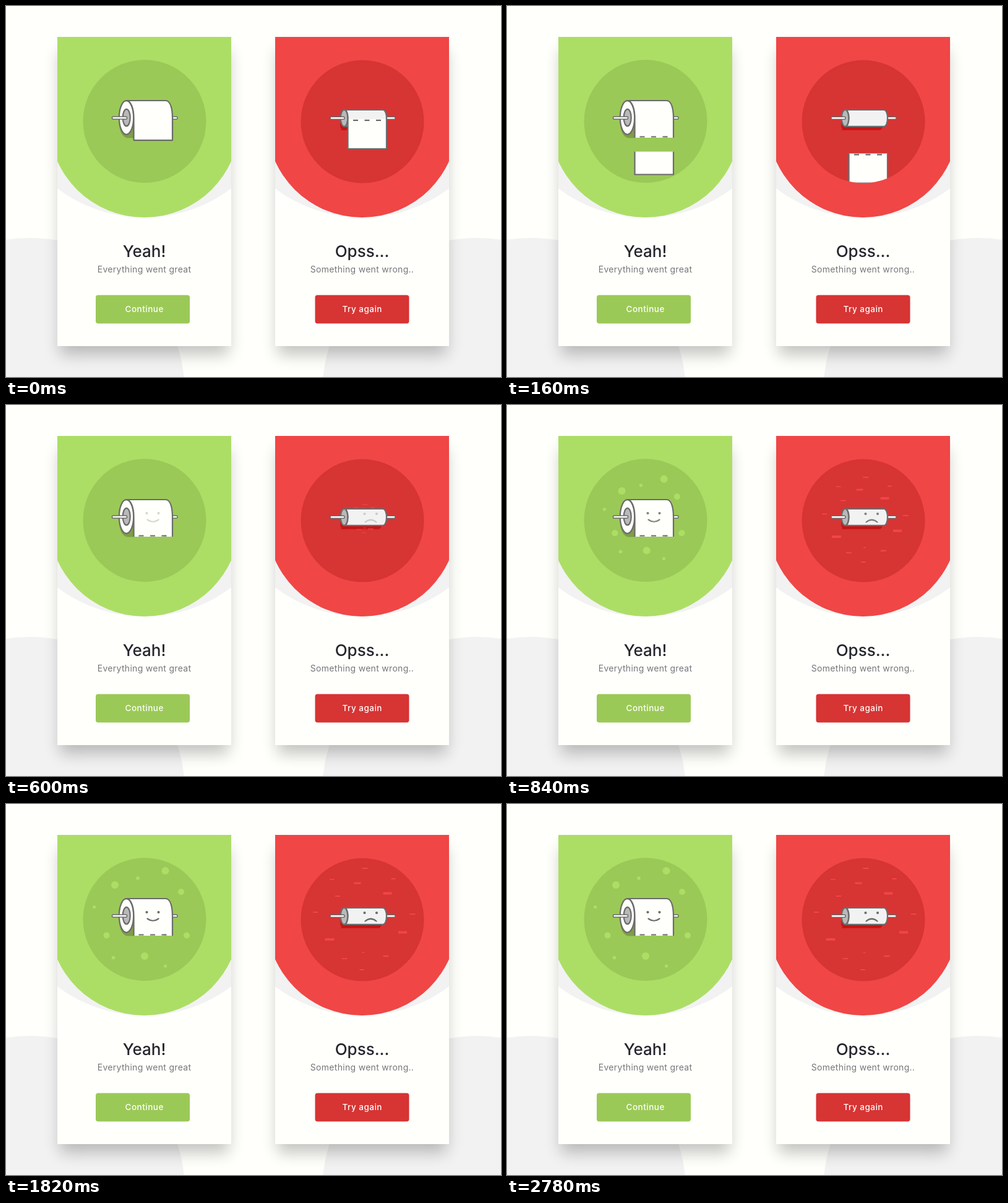
An HTML page that plays this animation: 800 px wide and 600 px high, repeating every 2.8 s.

```html
<!DOCTYPE html>
<html lang="en">
<head>
<meta charset="utf-8">
<title>Result cards</title>
<style>
  html, body { margin: 0; width: 100%; height: 100%; overflow: hidden; background: #fffffc; }
  svg { position: absolute; left: 0; top: 0; width: 800px; height: 600px; }
  .card { filter: drop-shadow(0 0 0 transparent); }
  .shadow { position: absolute; top: 50px; width: 281px; height: 500px;
    box-shadow: 0 18px 24px -4px rgba(0, 0, 0, .24); }
  text { font-family: Inter, "Open Sans", sans-serif; text-anchor: middle; }
  .title { font-size: 26px; font-weight: 500; fill: #25262d; }
  .note { font-size: 14px; letter-spacing: .3px; fill: #77777b; }
  .label { font-size: 13.5px; font-weight: 500; letter-spacing: .5px; fill: #fffffc; }
  .ink { stroke: #6b6b6b; stroke-width: 2.2; stroke-linejoin: round; }
  .paper { fill: #fffffc; }
  .line { fill: none; stroke-linecap: round; }
  .bar { fill: #fffffc; stroke: #6b6b6b; stroke-width: 1.6; }
  .face circle { fill: #6b6b6b; stroke: none; }
</style>
</head>
<body>
<svg viewBox="0 0 800 600" fill="#f2f2f2">
  <circle cx="38" cy="626" r="251"/>
  <circle cx="762" cy="626" r="251"/>
</svg>
<div class="shadow" style="left:83px"></div>
<div class="shadow" style="left:435px"></div>

<svg viewBox="0 0 800 600">
  <defs>
    <clipPath id="cardClip"><rect x="83" y="50" width="281" height="500"/></clipPath>
    <clipPath id="greenClip"><circle cx="224" cy="186.5" r="99.5"/></clipPath>
    <clipPath id="redClip"><circle cx="576" cy="187" r="99.5"/></clipPath>
    <path id="tube" d="M546.5 167.8H609C617 167.8 617 194.8 609 194.8H546.5C554.5 194.8 554.5 167.8 546.5 167.8Z"/>
  </defs>
  <g id="cards"></g>

  <!-- full roll -->
  <path fill="#7f9e45" d="M206.5 213.5H196C187 212 182.5 200 182.5 186H206.5Z"/>
  <g id="dots" fill="#acde66"></g>
  <rect class="bar" x="260" y="179" width="17" height="4" rx="1.5"/>
  <ellipse class="paper ink" cx="194.5" cy="180.5" rx="11.7" ry="27.3"/>
  <path class="paper" d="M194.5 153H258C266 153 269 167 269 181V213H206.5V181C206.5 166 202 153 194.5 153Z"/>
  <path class="ink" fill="none" d="M206.5 213V181C206.5 166 202 153 194.5 153H258C266 153 269 167 269 181V213"/>
  <path class="ink" d="M214.5 211.5H269" stroke-dasharray="8 10.5" fill="none"/>
  <ellipse class="ink" fill="#b9b9b9" cx="194.7" cy="180.5" rx="6" ry="13.7"/>
  <rect class="bar" x="171.5" y="179" width="24" height="4" rx="1.5"/>
  <g clip-path="url(#greenClip)"><g class="sheet">
    <path class="paper" d="M206.5 180H269V217H206.5Z"/>
    <path class="ink" fill="none" d="M206.5 180V217H269V180"/>
  </g></g>
  <g class="face ink">
    <circle cx="227.5" cy="175" r="2.1"/><circle cx="246.5" cy="175" r="2.1"/>
    <path class="line" d="M228.5 185.5Q237.5 192 246.5 185.5"/>
  </g>

  <!-- empty roll -->
  <use href="#tube" x="-7" y="6" fill="#c71414"/>
  <path fill="#c71414" d="M540 181H548V200.8H546Q540 200 540 192Z"/>
  <g id="dashes" fill="#f04646"></g>
  <rect class="bar" x="606" y="179.3" width="23" height="4" rx="1.5"/>
  <use href="#tube" class="ink" fill="#f2f2f2"/>
  <ellipse class="ink" fill="#b9b9b9" cx="546.5" cy="181.3" rx="5.8" ry="13.5"/>
  <rect class="bar" x="524" y="179.3" width="23" height="4" rx="1.5"/>
  <g clip-path="url(#redClip)"><g class="sheet">
    <path class="paper" d="M552.5 183H615V231H552.5Z"/>
    <path class="ink" fill="none" d="M552.5 183V231H615V183"/>
    <path class="ink" fill="none" d="M561 184.8H612" stroke-dasharray="8 10.5"/>
  </g></g>
  <g class="face ink">
    <circle cx="579.5" cy="176" r="2.1"/><circle cx="599" cy="176" r="2.1"/>
    <path class="line" d="M580.5 189.5Q589.5 182 598.5 189.5"/>
  </g>
</svg>

<script>
const LOOP = 2800;
const $ = id => document.getElementById(id);
const clamp = v => Math.min(1, Math.max(0, v));

function card(dx, main, dark, cy, buttonX, title, note, label) {
  return `<g transform="translate(${dx} 0)">
    <g clip-path="url(#cardClip)">
      <rect x="83" y="50" width="281" height="500" fill="#fffffc"/>
      <circle cx="223.5" cy="108.5" r="233.5" fill="#f2f2f2"/>
      <path d="M69.5 40H377.5V188A154 154 0 0 1 69.5 188Z" fill="${main}"/>
    </g>
    <circle cx="224" cy="${cy}" r="99.5" fill="${dark}"/>
    <text class="title" x="223.5" y="405.5">${title}</text>
    <text class="note" x="223.5" y="431">${note}</text>
    <rect x="${buttonX}" y="467.5" width="152" height="46" rx="4" fill="${dark}"/>
    <text class="label" x="223.7" y="495">${label}</text>
  </g>`;
}
$("cards").innerHTML =
  card(0, "#acde66", "#9bc957", 186.5, 145, "Yeah!", "Everything went great", "Continue") +
  card(352, "#f04646", "#d73434", 187, 147.5, "Opss...", "Something went wrong..", "Try again");

// Resting places: x, y, radius
const dots = [[257.5, 108, 6], [213, 120, 2.7], [176, 131, 6], [283, 142, 5], [142.5, 166.5, 2.6],
  [162.5, 212.5, 5], [292, 212.5, 5], [224, 246, 6], [173.5, 248.5, 2.8], [257.5, 262, 2.6]];
// Resting places: x, y, width, height
const dashes = [[580, 104, 9, 2], [527, 122, 8, 1.6], [568, 128, 11, 3], [626, 121, 7, 2],
  [616.5, 144.5, 14, 4], [536, 149, 8, 2], [500, 175, 8, 2], [657, 178, 9, 2], [641, 207.5, 14, 4],
  [523, 219, 15, 4], [547, 250, 9, 2], [575, 268, 7, 2], [614, 246, 9, 2.5], [577.5, 240, 4, 1.6]];

$("dots").innerHTML = dots.map(([, , r]) => `<circle r="${r}"/>`).join("");
$("dashes").innerHTML = dashes.map(([, , w, h]) =>
  `<rect x="${-w / 2}" y="${-h / 2}" width="${w}" height="${h}"/>`).join("");

function burst(group, places, cx, cy, k) {
  group.setAttribute("opacity", clamp(k * 2.2));
  places.forEach(([x, y], i) => group.children[i].setAttribute("transform",
    `translate(${cx + (x - cx) * k} ${cy + (y - cy) * k})`));
}

const sheets = document.querySelectorAll(".sheet");
const faces = document.querySelectorAll(".face");

function draw() {
  const t = performance.now() % LOOP;
  const fall = Math.min(130, 55 * (t / 160) ** 1.5);
  sheets.forEach(s => s.setAttribute("transform", `translate(0 ${fall})`));

  const k = 1 - (1 - clamp((t - 520) / 540)) ** 2;
  burst($("dots"), dots, 234, 180, k);
  burst($("dashes"), dashes, 580, 183, k);
  faces.forEach(f => f.setAttribute("opacity", k));
  requestAnimationFrame(draw);
}
draw();
</script>
</body>
</html>
```
